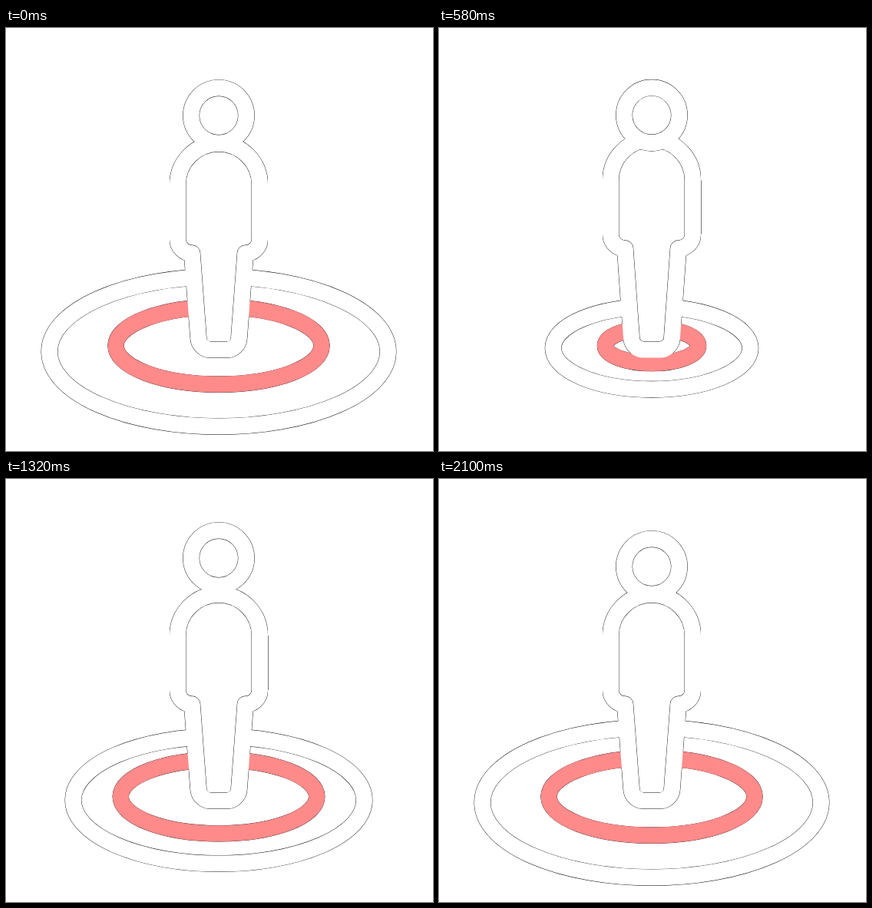
Animation, 556 px wide and 551 px high, one loop 3 s. Source, as an HTML page with a canvas:

```html
<!DOCTYPE html>
<html lang="en">
<head>
<meta charset="utf-8">
<title>Jumping figure</title>
<style>
html, body { margin: 0; width: 100%; height: 100%; overflow: hidden; background: #fff; }
canvas { display: block; }
</style>
</head>
<body>
<canvas id="stage" width="556" height="551"></canvas>
<script>
const ctx = document.getElementById('stage').getContext('2d');
const LOOP = 3000, STEP = 20, MID = 277;
const WIDE = 21, EDGE = 21.8, THIN = 21.4;
const INK = '#000', WHITE = '#fff', PINK = '#ff8a8a';

const ease = u => (1 - Math.cos(Math.PI * Math.min(1, Math.max(0, u)))) / 2;

// Eases through [time, value] points
function path(t, ...points) {
  let v = points[0][1];
  for (let i = 1; i < points.length; i++) {
    const [t0, v0] = points[i - 1], [t1, v1] = points[i];
    v += (v1 - v0) * ease((t - t0) / (t1 - t0));
  }
  return v;
}

// Swells from 0 to 1 and back
const bump = (t, from, peak, to) => path(t, [from, 0], [peak, 1], [to, 0]);

function pose(t) {
  const crouch = bump(t, 100, 400, 640);
  const ringX = path(t, [180, 220.5], [760, 102.5], [1130, 245], [1310, 189], [1450, 230], [1560, 220.5]);
  return {
    head: 114 + 26 * crouch - 58.5 * bump(t, 530, 820, 1520) - 15.5 * bump(t, 1400, 1720, 2100),
    shoulder: 204 + 11 * crouch - 57 * bump(t, 443, 1030, 1320),
    hip: 275 + 11 * crouch - 42 * bump(t, 400, 1030, 1320),
    foot: 419 - 40 * Math.max(0, 1 - ((t - 915) / 300) ** 2),
    ringX,
    ringY: 0.475 * ringX - 7.2,
    ringC: path(t, [100, 421.5], [760, 416], [1320, 418.3], [1560, 421.5]),
    pinkX: path(t, [160, 134], [760, 41.5], [1340, 128], [1560, 134])
  };
}

function ellipse(cy, rx, ry) {
  const p = new Path2D();
  p.ellipse(MID, cy, rx, ry, 0, 0, Math.PI * 2);
  return p;
}

function figure(s, h, f) {
  const p = new Path2D(), q = Math.PI / 2, knee = h + 18.5;
  p.arc(MID, s, 53.5, Math.PI, 0);
  p.arc(312, h, 18.5, 0, q);
  p.lineTo(311.7, knee);
  p.arcTo(302.3, f, MID, f, 16);
  p.arcTo(251.7, f, 242.3, knee, 16);
  p.lineTo(242.3, knee);
  p.arc(242, h, 18.5, q, Math.PI);
  p.closePath();
  return p;
}

function stroke(shape, color, width) {
  ctx.strokeStyle = color;
  ctx.lineWidth = width;
  ctx.stroke(shape);
}

function rect(color, x, y, w, h) {
  ctx.fillStyle = color;
  ctx.fillRect(x, y, w, h);
}

// Blanks a shape and draws the hairlines of others inside it
function hollow(shape, ...lines) {
  ctx.save();
  ctx.clip(shape);
  rect(WHITE, 0, 0, 556, 551);
  for (const line of lines) stroke(line, INK, EDGE);
  ctx.restore();
  stroke(shape, WHITE, WIDE);
}

function draw(t) {
  const v = pose(t);
  const ring = ellipse(v.ringC, v.ringX, v.ringY);
  const pink = ellipse(413.8, v.pinkX, v.pinkX * 0.376);
  const body = figure(v.shoulder, v.hip, v.foot);
  const head = ellipse(v.head, 35.9, 35.9);

  rect(WHITE, 0, 0, 556, 551);
  ctx.lineJoin = 'round';
  for (const shape of [ring, body, head]) stroke(shape, INK, EDGE);
  stroke(pink, INK, THIN);
  stroke(ring, WHITE, WIDE);
  stroke(pink, PINK, WIDE);
  hollow(body, body, head);

  // The outer sides have no hairline, but the right one shows in motion
  const top = v.shoulder - 7, tall = v.hip - v.shoulder + 12;
  const moving = t > 100 && t < 1700;
  rect(WHITE, 211, top, 2, tall);
  rect(WHITE, 341, top, 2, tall);
  if (moving) rect('#777', 341, v.shoulder, 1, v.hip - v.shoulder);

  hollow(head, head);
}

const start = performance.now();
function tick() {
  const t = (performance.now() - start) % LOOP;
  draw(Math.floor(t / STEP) * STEP);
  requestAnimationFrame(tick);
}
tick();
</script>
</body>
</html>
```
